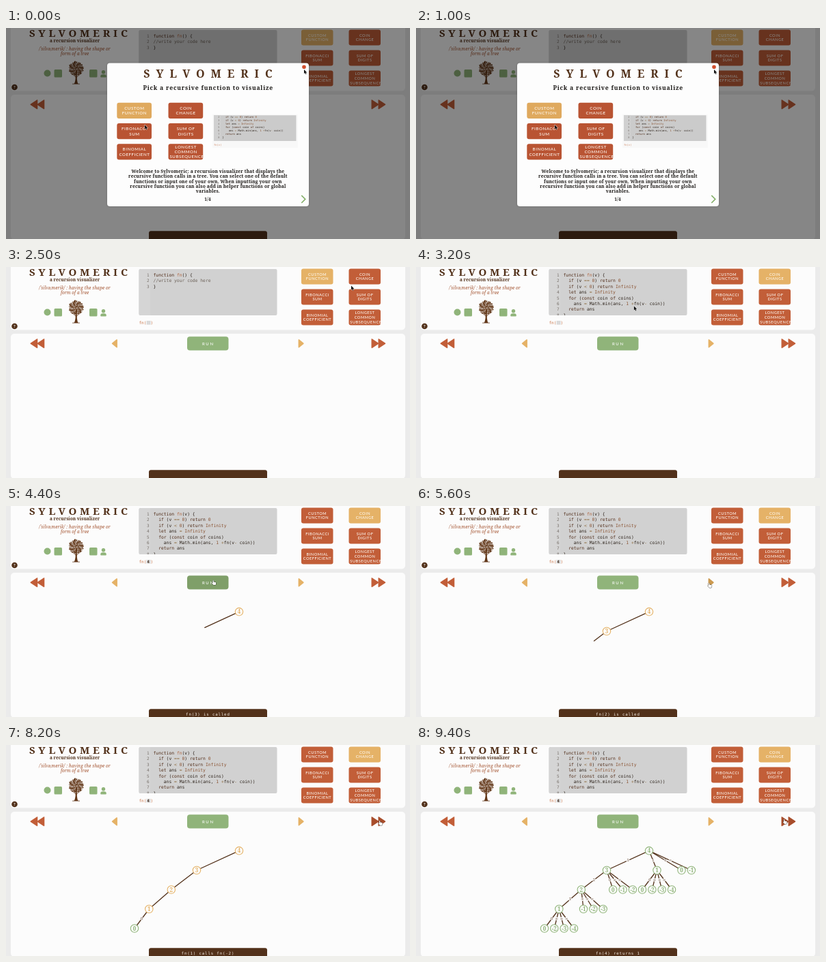
Recreate the animation shown at these times as an HTML page with a canvas. Size 591 px wide and 310 px high, loop 9500 ms.

```html
<!DOCTYPE html>
<html lang="en">
<head>
<meta charset="utf-8">
<title>Sylvomeric</title>
<style>
html, body { margin: 0; width: 100%; height: 100%; overflow: hidden; background: #ebebeb; }
canvas { display: block; width: 591px; height: 310px; }
</style>
</head>
<body>
<canvas id="stage"></canvas>
<script>
const W = 591, H = 310, LOOP = 9500, STEP = 100;
const canvas = document.getElementById('stage');
const ctx = canvas.getContext('2d');
const dpr = window.devicePixelRatio || 1;
canvas.width = W * dpr;
canvas.height = H * dpr;

const RED = '#c25e38', YELLOW = '#e5b267', GREEN = '#90b47a', BROWN = '#52311a', PAPER = '#fcfcfc';
const SERIF = '"Noto Serif", serif', SANS = 'Lato, sans-serif', MONO = '"DejaVu Sans Mono", monospace';

const clamp = x => Math.max(0, Math.min(1, x));
const smooth = x => x * x * (3 - 2 * x);
const easeOut = x => 1 - Math.pow(1 - clamp(x), 2.4);

function box(x, y, w, h, r, fill) {
  ctx.fillStyle = fill;
  ctx.beginPath();
  ctx.roundRect(x, y, w, h, r);
  ctx.fill();
}

function disc(x, y, r, fill) {
  ctx.fillStyle = fill;
  ctx.beginPath();
  ctx.arc(x, y, r, 0, 7);
  ctx.fill();
}

function text(str, x, y, font, fill, gap = 0, align = 'center', base = 'alphabetic') {
  ctx.font = font;
  ctx.fillStyle = fill;
  ctx.letterSpacing = gap + 'px';
  ctx.textAlign = align;
  ctx.textBaseline = base;
  ctx.fillText(str, align === 'center' ? x + gap / 2 : x, y);
}

// Function picker

const CHOICES = [
  ['CUSTOM', 'FUNCTION'], ['COIN', 'CHANGE'],
  ['FIBONACCI', 'SUM'], ['SUM OF', 'DIGITS'],
  ['BINOMIAL', 'COEFFICIENT'], ['LONGEST', 'COMMON', 'SUBSEQUENCE']
];

function picker(x, y, dx, dy, w, h, size, active, red, yellow) {
  CHOICES.forEach((lines, i) => {
    const bx = x + (i % 2) * dx, by = y + (i >> 1) * dy;
    box(bx, by, w, h, 3, i === active ? yellow : red);
    lines.forEach((line, k) => {
      const ty = by + h / 2 + (k - (lines.length - 1) / 2) * size * 1.2;
      const shift = line === 'SUBSEQUENCE' ? 1.4 : 0;
      text(line, bx + w / 2 + shift, ty + 0.3, `500 ${size}px ${SANS}`, '#fffaf4', size * 0.085, 'center', 'middle');
    });
  });
}

// Code panel

const BLANK = ['function fn() {', '//write your code here', '}'];
const COINS = [
  'function fn(v) {', '  if (v == 0) return 0', '  if (v < 0) return Infinity',
  '  let ans = Infinity', '  for (const coin of coins)',
  '    ans = Math.min(ans, 1 +fn(v- coin))', '  return ans', '}'
];
const TOKEN = /\/\/.*|\w+|\s+|[^\w\s]/g;

function tokenColor(word, head) {
  if (/^\/\//.test(word)) return '#6d6259';
  if (/^(function|return|if|let|for|const|of)$/.test(word)) return '#4f2a16';
  if (/^(\d+|Infinity)$/.test(word)) return '#8a5230';
  if (head && word === 'fn') return '#b0623b';
  if (/^[=<+\-]$/.test(word)) return '#8d6b3f';
  return '#2c221a';
}

function codeLine(line, x, y, size) {
  const font = `${size}px ${MONO}`;
  let col = 0;
  for (const word of line.match(TOKEN)) {
    text(word, x + col * size * 0.602, y, font, tokenColor(word, line.startsWith('function')), 0, 'left');
    col += word.length;
  }
}

function editor(lines) {
  ctx.save();
  ctx.beginPath();
  ctx.roundRect(194.5, 3, 202, 68, 2);
  ctx.clip();
  box(194, 3, 203, 68, 0, '#d1d1d1');
  box(194, 3, 17, 68, 0, '#d5d5d5');
  lines.forEach((line, i) => {
    const y = 14 + i * 8.4;
    text(i + 1, 209.5, y, `6px ${MONO}`, '#77706a', 0, 'right');
    codeLine(line, 215.5, y, 6.35);
  });
  ctx.restore();
}

// Header

function treeArt() {
  ctx.strokeStyle = ctx.fillStyle = '#623718';
  ctx.beginPath();
  ctx.moveTo(102, 62);
  ctx.quadraticCurveTo(102.3, 79, 99.5, 82);
  ctx.lineTo(105.5, 82);
  ctx.quadraticCurveTo(103.3, 79, 103.5, 62);
  ctx.fill();
  ctx.lineWidth = 0.6;
  for (let i = -2; i <= 2; i++) {
    ctx.beginPath();
    ctx.moveTo(102.7, 73);
    ctx.quadraticCurveTo(102.7 + i * 2, 69, 102.7 + i * 4.3, 62 + Math.abs(i) * 2);
    ctx.stroke();
  }
  for (let i = 0; i < 105; i++) {
    const a = i * 2.39996, r = Math.sqrt(i / 105);
    disc(102.7 + Math.cos(a) * r * 10.7, 59.5 + Math.sin(a) * r * 10, 0.7 + (i % 3) * 0.22, '#623718');
  }
  box(97, 81.8, 11, 0.7, 0.3, '#623718');
}

function person(x, y) {
  disc(x, y - 2.3, 2.7, GREEN);
  box(x - 4.3, y + 1.2, 8.6, 4.3, [3, 3, 1, 1], GREEN);
}

function header(t) {
  box(7, -8, 577, 100.5, 5, PAPER);
  text('SYLVOMERIC', 106, 13, `600 15px ${SERIF}`, BROWN, 4.8);
  text('a recursion visualizer', 100.5, 21, `600 6.5px ${SERIF}`, BROWN, 0.05);
  text('/ˈsilvəˌmerik/ : having the shape or', 100.5, 33, `italic 500 6.3px ${SERIF}`, '#a04d28', 0.17);
  text('form of a tree', 100.5, 39.5, `italic 500 6.3px ${SERIF}`, '#a04d28', 0.1);
  disc(60.5, 66.5, 5, GREEN);
  box(70.5, 61, 11.5, 11.5, 1.5, GREEN);
  treeArt();
  box(122, 61, 11.5, 11.5, 1.5, GREEN);
  person(142.5, 67);
  disc(12.5, 87, 4.3, BROWN);
  text('?', 12.5, 89.2, `bold 6px ${SANS}`, '#fff');

  const picked = t >= 2800;
  editor(picked ? COINS : BLANK);
  const font = `6px ${MONO}`;
  text('fn(', 194.5, 84, font, '#c87447', 0, 'left');
  box(205.5, 79, 6.2, 5.8, 0.8, '#dadada');
  if (t >= 3600) text('4', 206.2, 84, `bold ${font}`, '#4b382c', 0, 'left');
  text(')', 211.5, 84, font, '#c87447', 0, 'left');
  picker(432, 2.5, 69.5, 30, 46.5, 23, 5.7, picked ? 1 : 0, RED, YELLOW);
}

// Transport controls

function triangle(x, y, w, h, dir, fill) {
  ctx.fillStyle = ctx.strokeStyle = fill;
  ctx.lineWidth = 1.4;
  ctx.lineJoin = 'round';
  ctx.beginPath();
  ctx.moveTo(x + dir * w, y);
  ctx.lineTo(x, y - h);
  ctx.lineTo(x, y + h);
  ctx.closePath();
  ctx.fill();
  ctx.stroke();
}

function controls(t) {
  const overRun = t >= 3900 && t < 5000;
  const overNext = t >= 5300 && t < 7600;
  const overEnd = t >= 7800;
  triangle(45.6, 112.3, 9.4, 6.3, -1, RED);
  triangle(55.6, 112.3, 9.4, 6.3, -1, RED);
  triangle(162.2, 112.4, 6.7, 5.5, -1, YELLOW);
  triangle(428.3, 112.4, 6.7, 5.5, 1, overNext ? '#cc9a50' : YELLOW);
  const end = overEnd ? '#a84d2b' : RED;
  triangle(535.2, 112.3, 9.4, 6.3, 1, end);
  triangle(545.2, 112.3, 9.4, 6.3, 1, end);
  box(265, 102.3, 60.5, 20.2, 4, overRun ? '#7f9f69' : GREEN);
  text('RUN', 295, 114.6, `500 6px ${SANS}`, '#fff', 1.7);
}

// Call tree

const ROW = [155.3, 184, 212.5, 241, 269.5];
const END = 8600;
const nodes = [];

function addNode(value, parent, x, row, label, start = END, back = END + 300) {
  nodes.push({ value, parent, x, y: ROW[row], label, start, back });
  return nodes.length - 1;
}

function addLeaves(parent, x, row, values) {
  values.forEach((v, i) => addNode(v, parent, x + i * 14.35, row, v < 0 ? '∞' : '0'));
}

const n4 = addNode(4, -1, 341, 0, '', 3800);
const n3 = addNode(3, n4, 279, 1, '1', 4200);
const n2 = addNode(2, n3, 241.8, 2, '2', 5500);
const n1 = addNode(1, n2, 209.3, 3, '1', 6000);
addNode(0, n1, 188, 4, '0', 6700, 7300);
addLeaves(n1, 202.3, 4, [-2, -3, -4]);
addLeaves(n2, 245, 3, [-1, -2, -3]);
addLeaves(n3, 288.2, 2, [0, -1, -2]);
const m1 = addNode(1, n4, 352.5, 1, '1');
addLeaves(m1, 331, 2, [0, -2, -3, -4]);
addLeaves(n4, 388.5, 1, [0, -1]);

function callTree(t) {
  const shown = nodes.filter(n => t >= n.start);
  ctx.strokeStyle = BROWN;
  ctx.lineWidth = 1.3;
  ctx.lineCap = 'round';
  for (const n of shown) {
    const p = nodes[n.parent];
    if (!p) continue;
    const k = easeOut((t - n.start) / 400);
    ctx.beginPath();
    ctx.moveTo(p.x, p.y);
    ctx.lineTo(p.x + (n.x - p.x) * k, p.y + (n.y - p.y) * k);
    ctx.stroke();
  }
  for (const n of shown) {
    const p = nodes[n.parent];
    if (!p || t < n.back) continue;
    const x = (p.x + n.x) / 2, y = (p.y + n.y) / 2;
    disc(x, y, 2.4, PAPER);
    text(n.label, x, y, `5.5px ${SERIF}`, BROWN, 0, 'center', 'middle');
  }
  for (const n of shown) {
    if (n.parent >= 0 && t < n.start + 400) continue;
    const color = t >= n.back ? GREEN : YELLOW;
    disc(n.x, n.y, 5.7, PAPER);
    ctx.strokeStyle = color;
    ctx.lineWidth = 1.1;
    ctx.stroke();
    text(n.value, n.x, n.y + 3, `bold 8px ${SERIF}`, color);
  }
}

const STATUS = [
  [0, ''], [4100, 'fn(4) is called'], [4200, 'fn(4) calls fn(3)'], [4300, 'fn(3) is called'],
  [5300, 'fn(3) calls fn(2)'], [5500, 'fn(2) is called'], [5800, 'fn(2) calls fn(1)'],
  [6000, 'fn(1) is called'], [6400, 'fn(1) calls fn(0)'], [6700, 'fn(0) is called'],
  [7300, 'fn(0) returns 0'], [7500, 'fn(1) calls fn(-2)'], [END, 'fn(4) returns 1']
];

function statusBar(t) {
  box(209, 298.2, 173, 20, 3, BROWN);
  const line = STATUS.filter(s => t >= s[0]).pop()[1];
  text(line, 295, 307.6, `5.8px ${MONO}`, '#f4ece4', 0.82);
}

// Welcome dialog

const WELCOME = [
  'Welcome to Sylvomeric: a recursion visualizer that displays the',
  'recursive function calls in a tree. You can select one of the default',
  'functions or input one of your own. When inputting your own',
  'recursive function you can also add in helper functions or global',
  'variables.'
];

function dialog() {
  ctx.fillStyle = 'rgba(0,0,0,.47)';
  ctx.fillRect(0, 0, W, H);
  ctx.save();
  ctx.shadowColor = 'rgba(0,0,0,.2)';
  ctx.shadowBlur = 3 * dpr;
  box(148, 51.5, 295, 210.5, 4, '#fdfdfd');
  ctx.restore();
  disc(436, 57.3, 2.8, '#d2502f');
  text('SYLVOMERIC', 295.5, 73, `600 16px ${SERIF}`, BROWN, 9);
  text('Pick a recursive function to visualize', 295.3, 91, `600 8.6px ${SERIF}`, '#1d1a18', 0.78);
  picker(162.3, 109.8, 75.2, 30.2, 50.7, 23.2, 6.2, 0, '#b95433', '#dfa95e');

  box(302, 127, 125, 49, 0, '#f8f8f8');
  ctx.save();
  ctx.beginPath();
  ctx.rect(304, 128.3, 120.5, 37.7);
  ctx.clip();
  box(304, 128, 121, 38, 0, '#cbcbcb');
  box(304, 128, 10, 38, 0, '#d0d0d0');
  COINS.slice(1).forEach((line, i) => {
    const y = 132 + i * 5.05;
    text(i + 2, 312.5, y, `3.6px ${MONO}`, '#77706a', 0, 'right');
    codeLine(line, 316.5, y, 3.8);
  });
  ctx.restore();
  text('fn(v)', 304, 173, `3.8px ${MONO}`, '#d08a66', 0, 'left');
  arrow(203, 142.5);

  WELCOME.forEach((line, i) => text(line, 295.3, 213 + i * 7.25, `600 6.7px ${SERIF}`, '#1d1a18', 0.14));
  text('1/4', 295, 254, `600 6.5px ${SERIF}`, '#1d1a18', 0.1);
  ctx.strokeStyle = '#83ae68';
  ctx.lineWidth = 1.7;
  ctx.lineCap = 'butt';
  ctx.lineJoin = 'miter';
  ctx.beginPath();
  ctx.moveTo(432.3, 246);
  ctx.lineTo(437.7, 251.5);
  ctx.lineTo(432.3, 257);
  ctx.stroke();
}

// Pointer

const PATH = [
  [0, 436, 61], [1000, 436, 61], [1100, 434, 58], [1400, 434, 58], [2500, 505, 27.5],
  [2700, 523, 14], [2900, 523, 14], [3400, 208, 81], [3600, 208, 81], [4000, 302.5, 109],
  [5000, 302.5, 109], [5300, 428, 113], [7500, 428, 113], [7900, 546, 111],
  [8700, 546, 111], [9200, 538, 109], [9500, 538, 109]
];

function pointerAt(t) {
  const i = PATH.findIndex(p => p[0] > t);
  const a = PATH[i - 1], b = PATH[i];
  const k = smooth((t - a[0]) / (b[0] - a[0]));
  return [a[1] + (b[1] - a[1]) * k, a[2] + (b[2] - a[2]) * k];
}

function shape(x, y, d, fill, stroke) {
  ctx.save();
  ctx.translate(x, y);
  const p = new Path2D(d);
  ctx.lineJoin = 'round';
  ctx.lineWidth = 0.7;
  ctx.fillStyle = fill;
  ctx.strokeStyle = stroke;
  ctx.stroke(p);
  ctx.fill(p);
  ctx.restore();
}

function arrow(x, y) {
  shape(x, y, 'M0 0V6L1.4 4.8L2.4 7L3.4 6.5L2.5 4.4H4.3Z', '#111', '#eee');
}

function hand(x, y) {
  shape(x, y, 'M0 .6Q.6-.4 1.2.6V2.4L4 3Q4.8 3.2 4.7 4.2L4.2 7H.9L-1.2 4.3Q-1.3 3.4 0 4Z', '#fff', '#111');
}

function pointer(t) {
  const [x, y] = pointerAt(t);
  const onButton = (x > 432 && x < 548 && y < 25) || (y > 102 && y < 122 &&
    ((x > 265 && x < 326) || (x > 426 && x < 437) || x > 533));
  (onButton ? hand : arrow)(x, y);
}

function draw(t) {
  ctx.setTransform(dpr, 0, 0, dpr, 0, 0);
  ctx.fillStyle = '#ebebeb';
  ctx.fillRect(0, 0, W, H);
  header(t);
  box(7, 98, 577, 213, 5, PAPER);
  controls(t);
  callTree(t);
  statusBar(t);
  if (t < 1100) dialog();
  pointer(t);
}

const began = performance.now();
function tick() {
  const t = (performance.now() - began) % LOOP;
  draw(Math.floor(t / STEP) * STEP);
  requestAnimationFrame(tick);
}
tick();
</script>
</body>
</html>
```
